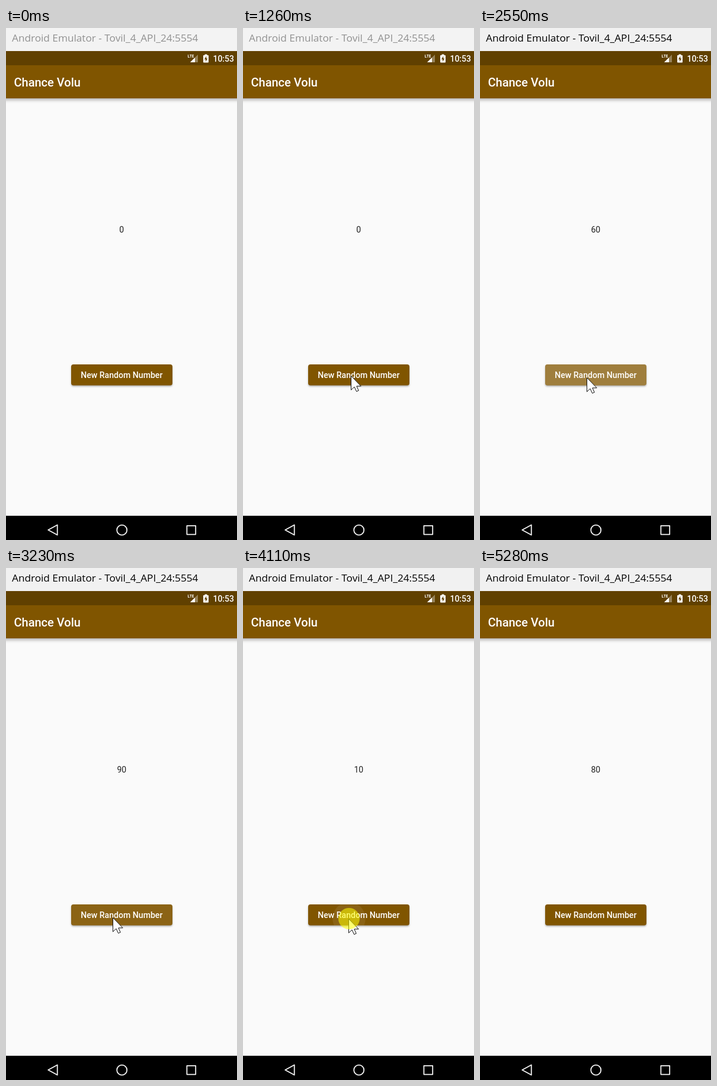
Animation, 390 px wide and 866 px high, one loop 5680 ms. Source, as an HTML page with a canvas:

```html
<!DOCTYPE html>
<html lang="en">
<head>
<meta charset="utf-8">
<title>Random number app</title>
<style>
  html, body { margin: 0; width: 100%; height: 100%; overflow: hidden; background: #fafafa; }
  canvas { display: block; width: 390px; height: 866px; }
</style>
</head>
<body>
<canvas id="stage" width="390" height="866"></canvas>
<script>
const ctx = document.getElementById('stage').getContext('2d');
const LOOP = 5680;
const TICK = 10;
const BROWN = '#805500';
const HOLD = 130;          // mouse button stays down
const RIPPLE_DELAY = 40;
const FADE = 170;

// The screen only refreshes inside these spans: start, end, refresh count.
const bursts = [
  [130, 660, 9], [790, 1330, 7], [1440, 1870, 8], [2260, 2760, 8], [2830, 3030, 3],
  [3170, 3300, 3], [3490, 4040, 9], [4110, 4610, 8], [4740, 5280, 9]
];

const clicks = [
  { down: 1330, clear: 1885, value: 20 },
  { down: 2330, clear: 2760, value: 60 },
  { down: 2830, clear: 3287, value: 90 },
  { down: 3560, clear: 4040, value: 10 },
  { down: 4040, clear: 4610, value: 80 }
];

const easeOut = p => 1 - (1 - p) ** 2;
const easeInOut = p => p * p * (3 - 2 * p);

// Pointer moves: start, end, from, to, easing.
const moves = [
  [130, 660, [302, 808], [170, 574], easeOut],
  [700, 1200, [170, 574], [182, 588], easeInOut],
  [2200, 2260, [182, 588], [180, 591], easeOut],
  [3430, 3490, [180, 591], [178, 593], easeOut],
  [4680, 4740, [178, 593], [175, 596], easeOut],
  [4740, 5280, [175, 596], [338, 872], easeInOut]
];

const clamp = v => Math.max(0, Math.min(1, v));

// Refreshes fall on whole ticks, so each one is rounded down to its tick.
function lastRefresh(t) {
  let shown = 0;
  for (const [start, end, count] of bursts) {
    if (t < start) break;
    const step = (end - start) / (count - 1);
    const index = Math.min(count - 1, Math.floor((t - start + TICK - 1) / step));
    shown = start + Math.floor(index * step / TICK + 1e-6) * TICK;
  }
  return shown;
}

function pointerAt(t) {
  if (t < 130 || t >= 5280) return null;
  let spot;
  for (const [start, end, from, to, ease] of moves) {
    if (t < start) break;
    const p = ease(clamp((t - start) / (end - start)));
    spot = from.map((v, i) => v + (to[i] - v) * p);
  }
  return spot;
}

function rect(x, y, w, h, color) {
  ctx.fillStyle = color;
  ctx.fillRect(x, y, w, h);
}

function text(str, x, y, font, color, align = 'left') {
  ctx.font = font;
  ctx.fillStyle = color;
  ctx.textAlign = align;
  ctx.fillText(str, x, y);
}

function polygon(points) {
  ctx.beginPath();
  points.forEach(([x, y]) => ctx.lineTo(x, y));
  ctx.closePath();
}

function disc(x, y, r, color) {
  ctx.beginPath();
  ctx.arc(x, y, r, 0, Math.PI * 2);
  ctx.fillStyle = color;
  ctx.fill();
}

function withShadow(alpha, blur, dy, draw) {
  ctx.save();
  ctx.shadowColor = `rgba(0,0,0,${alpha})`;
  ctx.shadowBlur = blur;
  ctx.shadowOffsetY = dy;
  draw();
  ctx.restore();
}

function drawStatusIcons() {
  text('LTE', 306.5, 50, '700 6.5px "Open Sans", sans-serif', '#fff');
  polygon([[311, 58], [324, 45], [324, 58]]);
  ctx.fillStyle = 'rgba(255,255,255,.35)';
  ctx.fill();
  polygon([[311, 58], [319, 50], [319, 58]]);
  ctx.fillStyle = '#fff';
  ctx.fill();

  rect(335.5, 44.5, 4, 2, '#fff');
  ctx.beginPath();
  ctx.roundRect(333, 46, 9, 12.5, 1);
  ctx.fill();
  polygon([[338.2, 47.5], [335, 53], [337, 53], [337, 57], [340.2, 51.5], [338.2, 51.5]]);
  ctx.fillStyle = '#604000';
  ctx.fill();
  text('10:53', 385, 57, '500 14px Roboto, sans-serif', '#fff', 'right');
}

function drawNavigation() {
  rect(0, 825, 390, 41, '#000');
  ctx.strokeStyle = '#f4f4f4';
  ctx.lineWidth = 1.8;
  ctx.lineJoin = 'round';
  polygon([[71.2, 849], [86.7, 840.5], [86.7, 857.5]]);
  ctx.stroke();
  ctx.beginPath();
  ctx.arc(195.7, 849.2, 8.5, 0, Math.PI * 2);
  ctx.stroke();
  ctx.strokeRect(305.4, 841.8, 14.8, 14.8);
}

function drawWindow(active) {
  rect(0, 0, 390, 866, '#fafafa');
  withShadow(.28, 5.4, 3.6, () => rect(-10, 63, 410, 56, BROWN));
  rect(0, 0, 390, 39, active ? '#f1f1f1' : '#f3f3f3');
  text('Android Emulator - Tovil_4_API_24:5554', 10, 23,
    '17.2px "Open Sans", sans-serif', active ? '#000' : '#919191');
  rect(0, 39, 390, 24, '#604000');
  drawStatusIcons();
  text('Chance Volu', 13.5, 99, '500 20px Roboto, sans-serif', '#fff');
  drawNavigation();
}

function buttonShape() {
  ctx.beginPath();
  ctx.roundRect(110, 569, 171, 35.5, 4);
}

function drawButton(t) {
  withShadow(.3, 3, 1.8, () => {
    buttonShape();
    ctx.fillStyle = BROWN;
    ctx.fill();
  });
  ctx.save();
  buttonShape();
  ctx.clip();
  for (const { down, clear } of clicks) {
    const age = t - down - RIPPLE_DELAY;
    if (age < 0 || t >= clear) continue;
    const alpha = .24 * Math.min(clamp(age / 90), clamp((clear - t) / FADE));
    const [x, y] = pointerAt(down);
    disc(x + 1, y, 8 + 165 * age / 250, `rgba(255,255,255,${alpha})`);
  }
  ctx.restore();
  text('New Random Number', 195.3, 592, '500 14.1px Roboto, sans-serif', '#fff', 'center');
}

function drawPointer([x, y]) {
  ctx.save();
  ctx.translate(x, y);
  polygon([[.5, .5], [.5, 24.2], [6, 19], [9.6, 26.8], [13.2, 25.2], [9.8, 17.8], [17.2, 17.8]]);
  ctx.fillStyle = '#fff';
  ctx.fill();
  ctx.strokeStyle = '#111';
  ctx.lineWidth = 1;
  ctx.lineJoin = 'round';
  ctx.stroke();
  ctx.restore();
}

function draw(t) {
  const pointer = pointerAt(t);
  const value = clicks.reduce((v, c) => t >= c.down + HOLD ? c.value : v, 0);
  drawWindow(t >= 1330);
  text(String(value), 195.3, 346, '14px Roboto, sans-serif', '#212121', 'center');
  drawButton(t);
  if (!pointer) return;
  drawPointer(pointer);
  if (clicks.some(c => t >= c.down && t < c.down + HOLD)) {
    disc(pointer[0] + 1, pointer[1], 18, 'rgba(255,255,0,.55)');
  }
}

function tick() {
  draw(lastRefresh(performance.now() % LOOP));
  requestAnimationFrame(tick);
}
tick();
</script>
</body>
</html>
```
